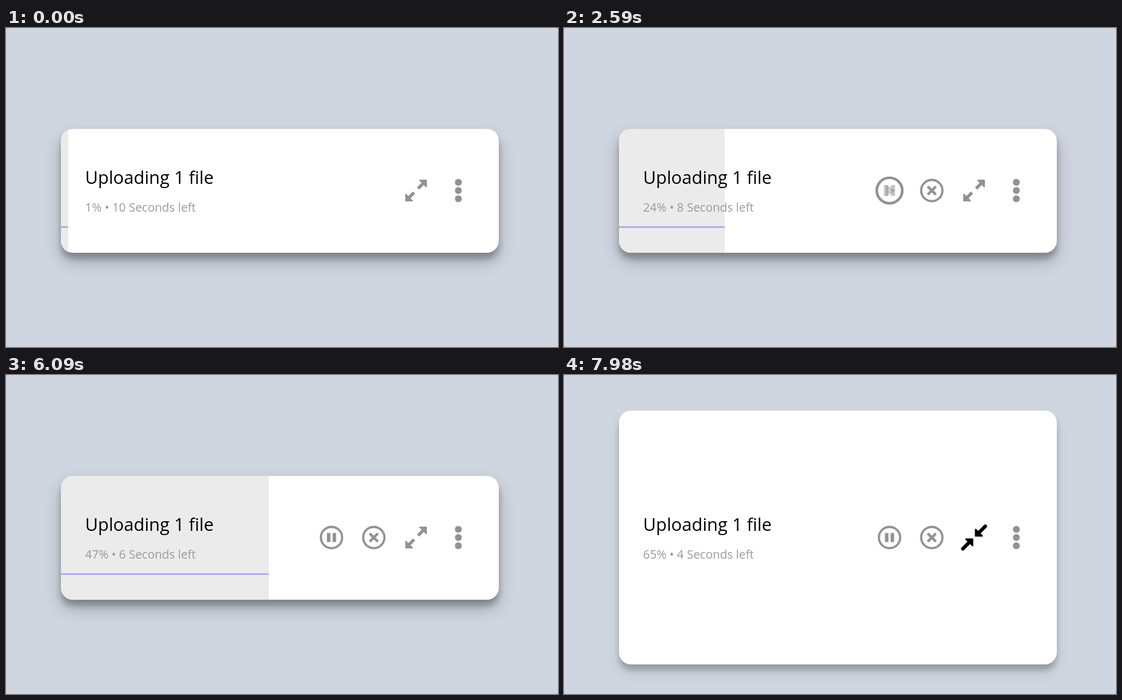
An HTML page for the animation above (8 s loop, 914x528 px).

```html
<!DOCTYPE html>
<html lang="en">
<head>
<meta charset="utf-8">
<title>Upload card</title>
<style>
  html, body { margin: 0; width: 100%; height: 100%; overflow: hidden; background: #6b6d72; }
  #stage { position: relative; width: 914px; height: 528px; border-radius: 2px; background: #d0d6e0; overflow: hidden; }
  #card { position: absolute; border-radius: 20px; background: #fff; overflow: hidden; }
  #progress { position: absolute; left: 0; top: 0; height: 100%; background: #ebebeb; }
  #line { position: absolute; left: 0; width: 100%; height: 3px; background: #b3aeec; }
  svg { position: absolute; left: 0; top: 0; }
  text { font-family: "Open Sans", "Noto Sans", sans-serif; }
  #title { font-size: 29.25px; fill: #000; }
  #status { font-size: 19.6px; fill: #9b9b9b; }
  .icon { fill: #929292; stroke: #929292; }
  .active { fill: #000; stroke: #000; }
  .ring { fill: none; stroke-width: 3.7; }
  .solid { stroke: none; }
</style>
</head>
<body>
<div id="stage">
  <div id="card"><div id="progress"><div id="line"></div></div></div>
  <svg width="914" height="528" viewBox="0 0 914 528">
    <defs>
      <g id="outArrow">
        <path d="M17 -17V-6.2L6.2 -17Z" stroke-width="1.8" stroke-linejoin="round"/>
        <path d="M12 -12L3.3 -3.3" stroke-width="5.2"/>
      </g>
      <g id="inArrow">
        <path d="M2.6 -2.6V-13.4L13.4 -2.6Z" stroke-width="2.4" stroke-linejoin="round"/>
        <path d="M7 -7L18.6 -18.6" stroke-width="5.8" stroke-linecap="round"/>
      </g>
    </defs>
    <g id="labels">
      <text id="title" x="131" y="258">Uploading 1 file</text>
      <text id="status" x="131" y="304"></text>
    </g>
    <g id="icons" class="icon">
      <g id="actions">
        <g id="toggle">
          <circle class="ring" r="17.6"/>
          <path id="pause" class="solid" d="M-7.6 -7.6h5.8v15.2h-5.8zM1.8 -7.6h5.8v15.2h-5.8z"/>
          <path id="play" d="M-4.5 -7L7 0L-4.5 7Z" stroke-width="1.5" stroke-linejoin="round"/>
        </g>
        <g transform="translate(609 269)">
          <circle class="ring" r="17.6"/>
          <path d="M-5.2 -5.2L5.2 5.2M5.2 -5.2L-5.2 5.2" stroke-width="4.4" stroke-linecap="square"/>
        </g>
      </g>
      <g transform="translate(679 269)">
        <g id="expand"><use href="#outArrow"/><use href="#outArrow" transform="rotate(180)"/></g>
        <g id="collapse" class="active"><use href="#inArrow"/><use href="#inArrow" transform="rotate(180)"/></g>
      </g>
      <g class="solid" transform="translate(749 269)">
        <circle cy="-13.6" r="5.7"/><circle r="5.7"/><circle cy="13.6" r="5.7"/>
      </g>
    </g>
  </svg>
</div>
<script>
const LOOP = 8000, STEP = 70;
const PAUSE_AT = 2392, RESUME_AT = 3605;
const GROW_AT = 6675, PEAK_AT = 7187, SETTLE_AT = 7720;
const el = Object.fromEntries([...document.querySelectorAll('[id]')].map(e => [e.id, e]));

const ramp = (t, from, to) => Math.min(1, Math.max(0, (t - from) / (to - from)));
const ease = (t, from, to) => (1 - Math.cos(Math.PI * ramp(t, from, to))) / 2;
const mix = (a, b, k) => a + (b - a) * k;

function percentAt(t) {
  const paused = Math.min(RESUME_AT, Math.max(PAUSE_AT, t)) - PAUSE_AT;
  return 1.6 + 0.0094 * (t - paused);
}

function drawCard(t, percent) {
  const grow = ease(t, GROW_AT, PEAK_AT), settle = ease(t, PEAK_AT, SETTLE_AT);
  const bulge = grow - settle;
  const width = 725 + 28 * bulge;
  const height = mix(205, 450, grow) - 30 * settle;
  const glow = mix(0.25, 0.08, settle);
  Object.assign(el.card.style, {
    left: 453.5 - width / 2 + 'px',
    top: mix(269.5, 269, grow) - height / 2 + 'px',
    width: width + 'px',
    height: height + 'px',
    boxShadow: `0 14px 28px rgba(0,0,0,${glow}), 0 10px 10px rgba(0,0,0,.22)`
  });
  el.progress.style.width = percent + '%';
  el.progress.style.opacity = 1 - ramp(t, GROW_AT, PEAK_AT + 10);
  el.line.style.top = 0.7995 * height - 2.9 + 'px';
  el.labels.setAttribute('transform', `translate(${-14 * bulge})`);
  el.icons.setAttribute('transform', `translate(${7 * bulge})`);
}

function drawIcons(t) {
  const shown = ease(t, 700, 1050) - ease(t, 4700, 5050) + ease(t, 5500, 5850);
  const hover = ease(t, 1490, 1690) - ease(t, 4200, 4390);
  const play = ease(t, 2400, 2800) - ease(t, 3590, 3860);
  const open = ease(t, 6580, 6730);
  el.actions.setAttribute('opacity', shown);
  el.toggle.setAttribute('transform', `translate(539 269) scale(${1 + 0.2 * hover})`);
  el.pause.setAttribute('opacity', 1 - play);
  el.play.setAttribute('opacity', play);
  el.expand.setAttribute('opacity', 1 - open);
  el.collapse.setAttribute('opacity', open);
}

function render(time) {
  const t = Math.floor((time % LOOP) / STEP) * STEP;
  const percent = percentAt(t);
  drawCard(t, percent);
  drawIcons(t);
  el.status.textContent = `${Math.floor(percent)}% • ${Math.ceil(10 - percent / 10)} Seconds left`;
}

const start = performance.now();
function tick() {
  render(performance.now() - start);
  requestAnimationFrame(tick);
}
tick();
</script>
</body>
</html>
```
